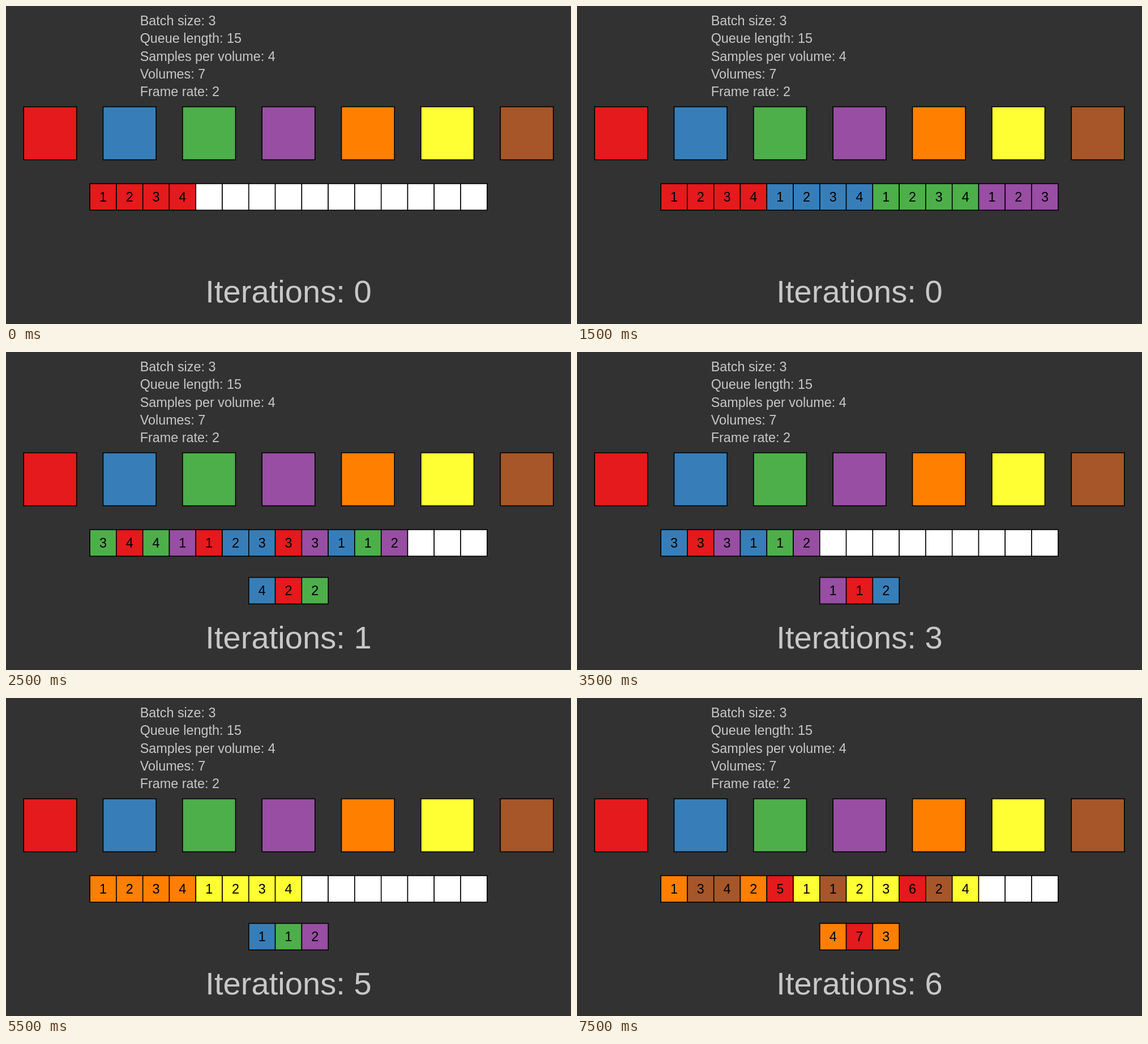
Animation of 998x561 px, one loop 8000 ms. Source, as an HTML page with a canvas:

```html
<!DOCTYPE html>
<html lang="en">
<head>
<meta charset="utf-8">
<title>Sample queue</title>
<style>
html, body { margin: 0; width: 100%; height: 100%; overflow: hidden; background: #323232; }
canvas { display: block; width: 998px; height: 561px; }
</style>
</head>
<body>
<canvas id="stage" width="998" height="561"></canvas>
<script>
const ctx = document.getElementById('stage').getContext('2d');
const SCALE = 998 / 1280;
const FONT = '"Liberation Sans", Arial, Helvetica, sans-serif';
const STEP = 500, STEPS = 16;
const SLOTS = 15, BATCH = 3, PER_VOLUME = 4, CELL = 60;

const COLORS = {
  R: '#e41a1c', B: '#377eb8', G: '#4daf4a', P: '#984ea3',
  O: '#ff7f00', Y: '#ffff33', N: '#a65628'
};
const INFO = ['Batch size: 3', 'Queue length: 15', 'Samples per volume: 4', 'Volumes: 7', 'Frame rate: 2'];

// Each sample is a volume letter followed by its number.
const parse = s => s.split(' ');
const ROUNDS = [
  {
    start: 0,
    filled: parse('R1 R2 R3 R4 B1 B2 B3 B4 G1 G2 G3 G4 P1 P2 P3'),
    shuffled: parse('B4 R2 G2 G3 R4 G4 P1 R1 B2 B3 R3 P3 B1 G1 P2')
  },
  {
    start: 10,
    filled: parse('O1 O2 O3 O4 Y1 Y2 Y3 Y4 N1 N2 N3 N4 R5 R6 R7'),
    shuffled: parse('O4 R7 O3 O1 N3 N4 O2 R5 Y1 N1 Y2 Y3 R6 N2 Y4')
  }
];
const FILL_STEPS = Math.ceil(SLOTS / PER_VOLUME);
const ROUND_BATCHES = SLOTS / BATCH;

function stateAt(step) {
  const index = step < ROUNDS[1].start ? 0 : 1;
  const { start, filled, shuffled } = ROUNDS[index];
  const local = step - start;
  const taken = Math.max(0, local - FILL_STEPS);
  const queue = local < FILL_STEPS
    ? filled.slice(0, (local + 1) * PER_VOLUME)
    : shuffled.slice(taken * BATCH);
  let batch = [];
  if (taken) batch = shuffled.slice((taken - 1) * BATCH, taken * BATCH);
  else if (index) batch = ROUNDS[index - 1].shuffled.slice(-BATCH);
  return { queue, batch, iterations: index * ROUND_BATCHES + taken };
}

function text(str, x, y, size, color, align) {
  ctx.font = `${size * SCALE}px ${FONT}`;
  ctx.fillStyle = color;
  ctx.textAlign = align;
  ctx.fillText(str, x * SCALE, y * SCALE);
}

function box(x, y, size, color) {
  const rect = [x, y, size, size].map(v => v * SCALE);
  ctx.fillStyle = color;
  ctx.fillRect(...rect);
  ctx.strokeRect(...rect);
}

function row(samples, count, y) {
  const left = 640 - count * CELL / 2;
  for (let i = 0; i < count; i++) {
    const x = left + i * CELL, s = samples[i];
    box(x, y, CELL, s ? COLORS[s[0]] : '#fff');
    if (s) text(s[1], x + CELL / 2, y + 40, 30, '#000', 'center');
  }
}

function draw(step) {
  const { queue, batch, iterations } = stateAt(step);
  ctx.fillStyle = '#323232';
  ctx.fillRect(0, 0, 998, 561);
  ctx.strokeStyle = '#000';
  ctx.lineWidth = 2 * SCALE;

  INFO.forEach((line, i) => text(line, 303.5, 44 + i * 40, 30, '#c8c8c8', 'left'));
  Object.values(COLORS).forEach((color, i) => box(40 + i * 180, 228, 120, color));
  row(queue, SLOTS, 402);
  if (batch.length) row(batch, BATCH, 510);
  text('Iterations: ' + iterations, 640, 671, 72, '#c8c8c8', 'center');
}

const began = performance.now();
function tick() {
  const elapsed = Math.max(0, performance.now() - began);
  draw(Math.floor(elapsed / STEP) % STEPS);
  requestAnimationFrame(tick);
}
tick();
</script>
</body>
</html>
```
